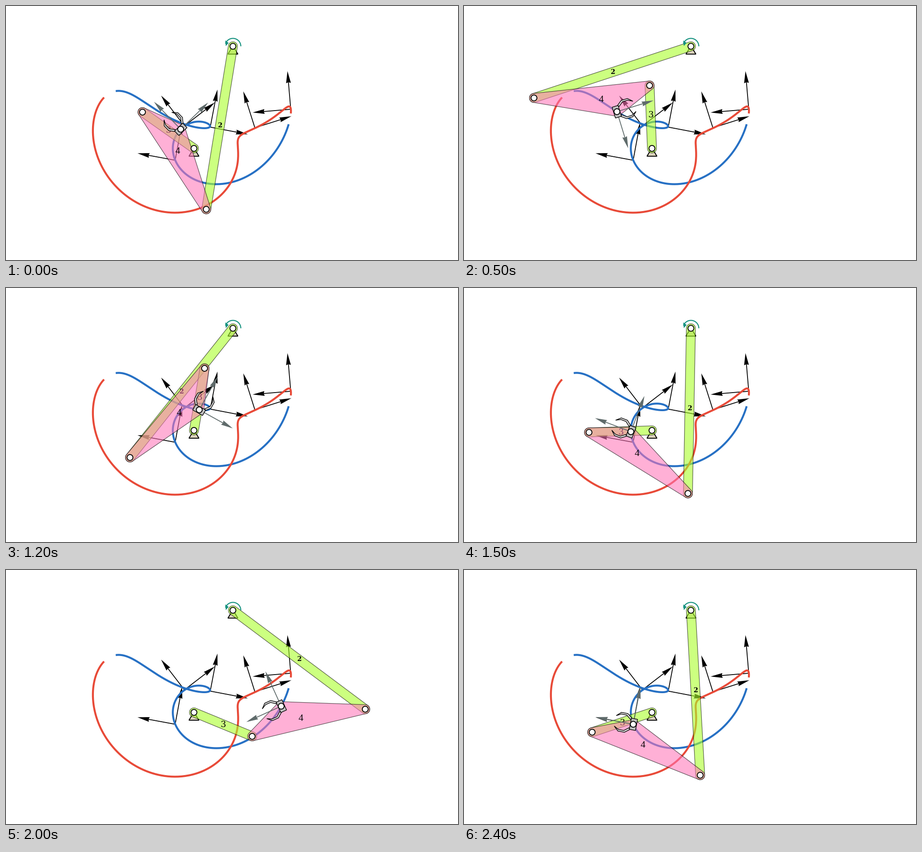
Write a matplotlib script that moves like this. It is 998 px wide and 561 px high and loops after 2500 ms.

```python
import numpy as np
import matplotlib.pyplot as plt
from matplotlib.animation import FuncAnimation
from matplotlib.patches import Arc, Circle, Polygon

W, H, DPI = 998, 561, 100
FRAMES, INTERVAL = 25, 100

# Linkage geometry in pixels, y pointing down
A = np.array([501.0, 89.0])
B = np.array([415.0, 314.5])
CRANK, COUPLER, ROCKER = 364.8, 256.7, 139.05
ALONG, ACROSS = 178.9, 49.8
TOOL_TURN = np.radians(-10.9)
MID, SWING = -20.78, 78.125
RADIUS, ARROW = 10, 84.5

GREEN = (170 / 255, 1, 43 / 255, 0.6)
PINK = (1, 116 / 255, 184 / 255, 0.57)
EDGE = (0, 0, 0, 0.65)
RED, BLUE = "#e84a38", "#2670c4"
TEAL, GRAY = "#14917f", "#5f6b6b"


def px(n):
    return n * 72 / DPI


def perp(v):
    return np.array([-v[1], v[0]])


def unit(angle):
    return np.array([np.cos(angle), np.sin(angle)])


def linkage(theta, branch=-1):
    """Crank end, rocker end, tool point and coupler direction."""
    t = np.radians(theta)
    p = A + CRANK * np.array([np.sin(t), np.cos(t)])
    d = B - p
    dist = np.hypot(*d)
    c = (COUPLER**2 + dist**2 - ROCKER**2) / (2 * COUPLER * dist)
    angle = np.arctan2(d[1], d[0]) + branch * np.arccos(np.clip(c, -1, 1))
    u = unit(angle)
    return p, p + COUPLER * u, p + ALONG * u + ACROSS * perp(u), angle


def crank_angle(frame):
    """Constant-speed swing back and forth."""
    s = ((frame - 0.92) / FRAMES) % 1
    tri = 1 - abs(((s + 0.25) % 1) * 4 - 2)
    return MID - SWING * tri


DIRS = np.array([unit(a) for a in np.linspace(0, 2 * np.pi, 360, endpoint=False)])


def rounded_hull(*points):
    pts = np.array(points)
    return pts[np.argmax(DIRS @ pts.T, axis=1)] + RADIUS * DIRS


def place(shape, origin, angle):
    x = unit(angle)
    return origin + shape[:, :1] * x + shape[:, 1:] * perp(x)


fig = plt.figure(figsize=(W / DPI, H / DPI), dpi=DPI, facecolor="white")
ax = fig.add_axes([0, 0, 1, 1])
ax.set_xlim(0, W)
ax.set_ylim(H, 0)
ax.axis("off")


def polygon(fill, edge, width, z, points=((0, 0), (1, 0), (0, 1))):
    patch = Polygon(points, closed=True, fc=fill, ec=edge, lw=px(width),
                    joinstyle="miter", zorder=z)
    return ax.add_patch(patch)


def pin(center, z=9):
    return ax.add_patch(Circle(center, 6.5, fc="white", ec="black", lw=px(1.9), zorder=z))


def label(text, size, z, family="DejaVu Serif", weight="normal"):
    return ax.text(0, 0, text, family=family, weight=weight, size=px(size),
                   ha="center", va="center_baseline", zorder=z)


class Axes2:
    """Pair of perpendicular arrows sharing an origin."""

    HEAD = np.array([[ARROW, 0], [58, -5.3], [60, 0], [58, 5.3]])

    def __init__(self, color, z):
        self.lines = [ax.plot([], [], color=color, lw=px(1.8), zorder=z,
                              solid_capstyle="butt")[0] for _ in range(2)]
        self.heads = [polygon(color, "none", 0, z) for _ in range(2)]

    def set(self, origin, angle):
        for k in range(2):
            a = angle + k * np.pi / 2
            end = origin + (ARROW - 22) * unit(a)
            self.lines[k].set_data(*zip(origin, end))
            self.heads[k].set_xy(place(self.HEAD, origin, a))


# Goal poses
for x, y, deg in [(373.5, 340.7, 190.5), (394, 264.8, 232.4), (451, 267.5, -79.2),
                  (549.5, 269, 252.4), (628.7, 228, 175.1)]:
    Axes2("black", 1).set(np.array([x, y]), np.radians(deg))

# Tool paths of both assembly branches
sweep = MID + SWING * np.sin(np.linspace(-np.pi / 2, np.pi / 2, 500))
for branch, color in [(-1, BLUE), (1, RED)]:
    path = np.array([linkage(t, branch)[2] for t in sweep])
    ax.plot(*path.T, color=color, lw=px(4.3), zorder=2, solid_capstyle="butt")

# Ground supports
for c in (A, B):
    polygon("#dcd4be", "black", 2, 2.5, c + np.array([[0, -1], [11, 17.3], [-11, 17.3]]))

# Turning direction
ax.add_patch(Arc(A, 35, 35, theta1=200, theta2=360, ec=TEAL, lw=px(2.2), zorder=8))
polygon(TEAL, "none", 0, 8, [(484, 76), (491.5, 81.5), (485.3, 88.5)])

crank = polygon(GREEN, EDGE, 1.2, 3)
text2 = label("2", 14.5, 3.1, weight="bold")
rocker = polygon(GREEN, EDGE, 1.2, 4)
text3 = label("3", 19, 4.1)
coupler = polygon(PINK, EDGE, 1.2, 5)
text4 = label("4", 21.5, 5.1, family="Liberation Serif")
tool_axes = Axes2(GRAY, 6)

PALM = np.array([[-7.3, -12.5], [6.5, -12.5], [6.5, 12.5], [-7.3, 12.5]])
JAW = np.array([[5, -12.5], [16, -21], [30.5, -21], [40.5, -11.8],
                [30, -17.3], [18, -17.3], [8, -9.5]])
GRIP = [JAW, JAW * [1, -1], PALM]
grip = [polygon(c, "black", 1.4, 7) for c in ("#dedede", "#dedede", "#c0c0c0")]

pin(A)
pin(B)
pins = [pin((0, 0)) for _ in range(3)]


def update(frame):
    p, q, c, angle = linkage(crank_angle(frame))
    crank.set_xy(rounded_hull(A, p))
    rocker.set_xy(rounded_hull(B, q))
    coupler.set_xy(rounded_hull(p, q, c))

    rise2 = ((p - A)[1] / CRANK) ** 2
    rise3 = ((q - B)[1] / ROCKER) ** 2
    text2.set_position((A + p) / 2 + (1, -0.8 - 6 * rise2))
    text3.set_position((B + q) / 2 + (0.7, 0.2 - 6 * rise3))
    text4.set_position((p + q + c) / 3 + (2.5, 0.7))

    tool = angle + TOOL_TURN
    tool_axes.set(c, tool)
    for patch, shape in zip(grip, GRIP):
        patch.set_xy(place(shape, c, tool))
    for patch, center in zip(pins, (p, q, c)):
        patch.center = center
    return []


anim = FuncAnimation(fig, update, frames=FRAMES, interval=INTERVAL,
                     repeat=True, repeat_delay=0, blit=False)
plt.show()
```
